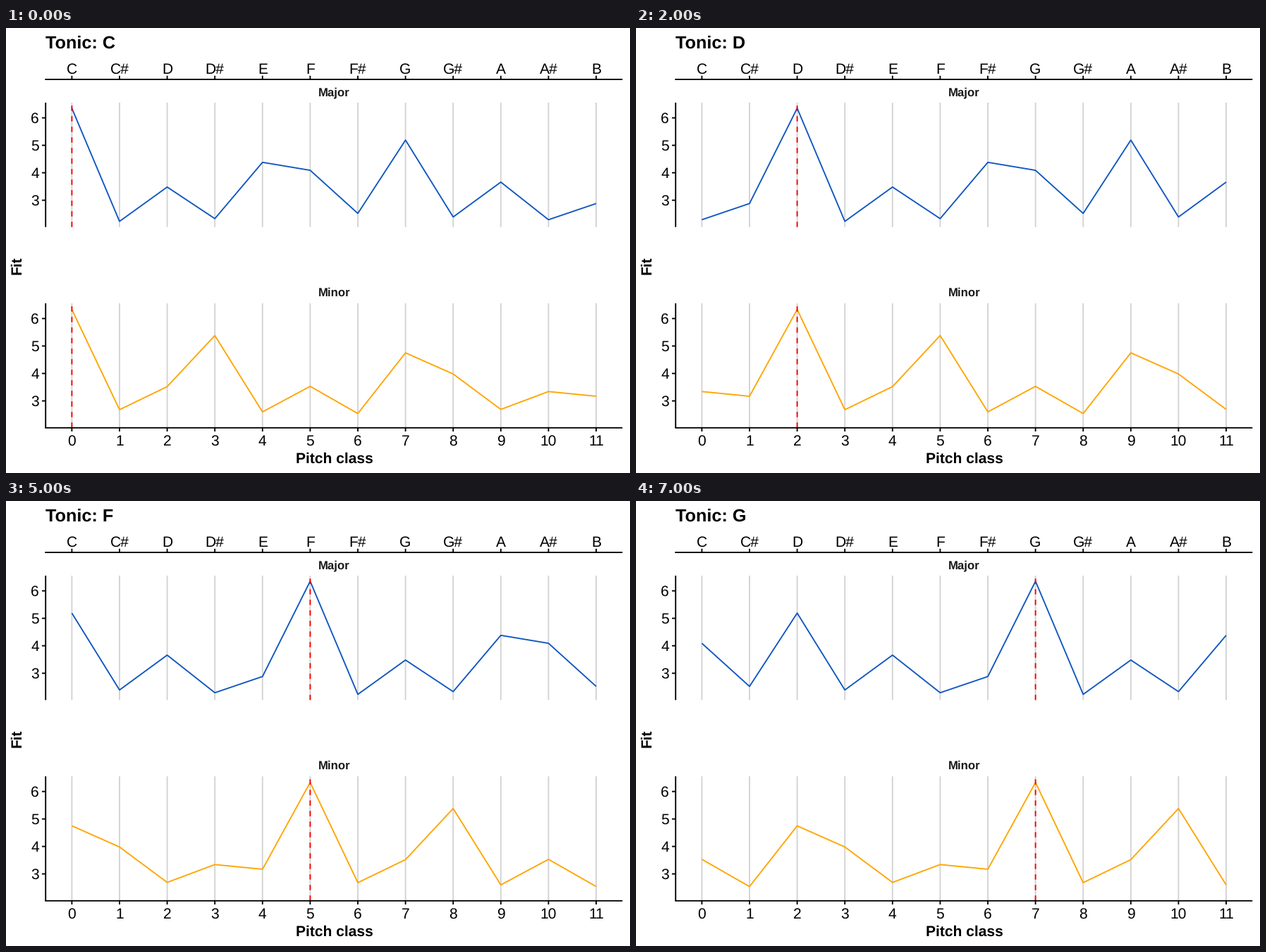
A matplotlib script that plays this animation: 885x632 px, repeating every 8000 ms.

```python
import matplotlib.pyplot as plt
from matplotlib.animation import FuncAnimation
import numpy as np

plt.rcParams.update({
    "font.family": "Liberation Sans",
    "text.hinting": "none",
    "path.snap": False,
})

W, H, DPI = 885, 632, 64
PT = 72 / DPI                      # points per pixel
LINE = 1.87                        # line weight in pixels
LEFT, RIGHT = 56.2, 874.3          # panel edges
X0, STEP = 93.4, 67.6              # first pitch class and spacing
UNIT, PANEL_H = 39, 176.7          # pixels per fit unit, panel height
TOP_AXIS, BOTTOM_AXIS = 73, 567.8

NOTES = ["C", "C#", "D", "D#", "E", "F", "F#", "G", "G#", "A", "A#", "B"]
MAJOR = [6.35, 2.23, 3.48, 2.33, 4.38, 4.09, 2.52, 5.19, 2.39, 3.66, 2.29, 2.88]
MINOR = [6.33, 2.68, 3.52, 5.38, 2.60, 3.53, 2.54, 4.75, 3.98, 2.69, 3.34, 3.17]

fig = plt.figure(figsize=(W / DPI, H / DPI), dpi=DPI, facecolor="white")
ax = fig.add_axes([0, 0, 1, 1])
ax.set_xlim(0, W)
ax.set_ylim(H, 0)
ax.axis("off")

xs = X0 + STEP * np.arange(12)


def line(x, y, color="black", z=3, **kw):
    kw.setdefault("solid_capstyle", "butt")
    return ax.plot(x, y, color=color, lw=LINE * PT, zorder=z, **kw)[0]


def text(x, y, s, size=21, ha="center", **kw):
    kw.setdefault("va", "baseline")
    return ax.text(x, y, s, fontsize=size * PT, ha=ha, **kw)


class Panel:
    def __init__(self, name, top, profile, color):
        self.top, self.profile = top, np.array(profile)
        bottom = top + PANEL_H
        text(465.4, top - 9.8, name, 16.8, weight="bold", color="#1a1a1a")
        for x in xs:
            line([x, x], [top, bottom], "#d3d3d3", z=1)
        line([LEFT, LEFT], [top, bottom])
        for v in range(3, 7):
            y = self.to_y(v)
            line([LEFT - 5.2, LEFT], [y, y])
            text(46.8, y + 7.5, str(v), ha="right")
        self.curve = line(xs, xs, color, z=2, solid_joinstyle="round")
        self.marker = line([0, 0], [bottom, top], "#ff0000", z=2.5,
                           dash_capstyle="butt")
        self.marker.set_linestyle((0, (7.5 / LINE, 7.5 / LINE)))

    def to_y(self, v):
        return self.top + 21.6 + (6 - v) * UNIT

    def show(self, tonic):
        self.curve.set_ydata(self.to_y(np.roll(self.profile, tonic)))
        self.marker.set_xdata([xs[tonic]] * 2)


panels = [Panel("Major", 106, MAJOR, "#0f56c0"),
          Panel("Minor", 391, MINOR, "#ffa500")]

# Shared horizontal axes
for y, tick in [(TOP_AXIS, -5.2), (BOTTOM_AXIS, 5.2)]:
    line([LEFT - LINE / 2, RIGHT], [y, y])
    for x in xs:
        line([x, x], [y, y + tick])
for i, x in enumerate(xs):
    text(x, 65, NOTES[i])
    text(x, 593, str(i))

text(465.4, 617.5, "Pitch class", weight="bold")
text(25.3, 337, "Fit", ha="right", va="center", rotation=90, weight="bold")
title = text(56.2, 29, "", 25.2, ha="left", weight="bold")


def update(tonic):
    title.set_text(f"Tonic: {NOTES[tonic]}")
    for panel in panels:
        panel.show(tonic)
    return []


anim = FuncAnimation(fig, update, frames=8, interval=1000,
                     repeat=True, repeat_delay=0, blit=False)
plt.show()
```
